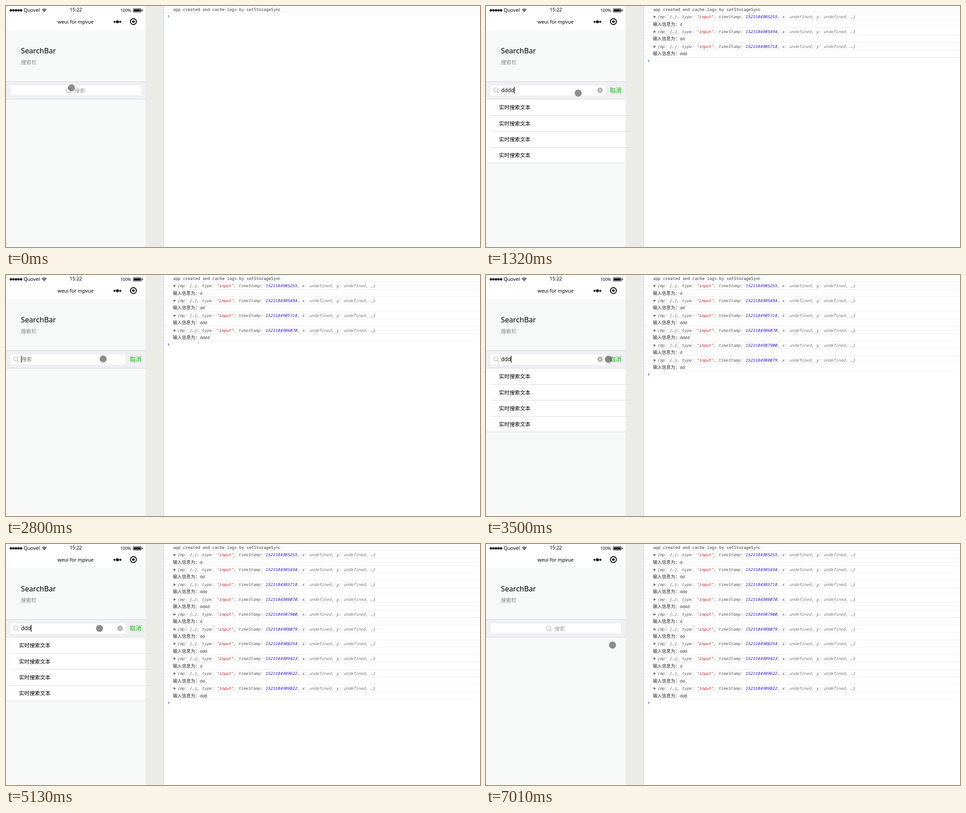
An HTML page that plays this animation: 1049 px wide and 534 px high, repeating every 7.08 s.

```html
<!DOCTYPE html>
<html lang="zh-CN">
<head>
<meta charset="utf-8">
<title>SearchBar</title>
<style>
  html, body { margin: 0; width: 100%; height: 100%; overflow: hidden; background: #fff; }
  svg { display: block; width: 1049px; height: 534px; }
  text { font-family: "Noto Sans", "Noto Sans CJK SC", sans-serif; white-space: pre; }
  .cjk { font-family: "Noto Sans CJK SC", sans-serif; font-size: 11.6px; }
  .mono { font-family: "Noto Sans Mono", monospace; font-size: 9.02px; fill: #303030; }
  .event { font-style: italic; fill: #565656; }
  .undef { fill: #747474; }
  .info { font-size: 9.85px; fill: #222; }
  .mid { text-anchor: middle; }
  .hint { fill: #888; }
  .field { fill: #fff; stroke: #e6e6ea; stroke-width: .6; }
</style>
</head>
<body>
<svg viewBox="0 0 1049 534">
  <defs>
    <g id="lens" fill="none" stroke="#a9a9a9" stroke-width="1.1">
      <circle r="4.8"/><path d="M3.5 3.5l3.4 3.4"/>
    </g>
  </defs>
  <rect width="309" height="534" fill="#f7f8f8"/>
  <rect width="309" height="53" fill="#fff"/>
  <rect x="309" width="40" height="534" fill="#ebece8"/>
  <rect x="349" width="1" height="534" fill="#d4d4d2"/>

  <g id="signal"></g>
  <text x="39" y="12.6" font-size="10.8">Quovel</text>
  <g fill="none" stroke="#000" stroke-width="1.4">
    <path d="M79.8 8.6Q84.6 4.6 89.4 8.6M81.6 10.6Q84.6 8.2 87.6 10.6"/>
    <circle cx="84.6" cy="12" r=".5"/>
  </g>
  <text class="mid" x="154.5" y="12.4" font-size="10.6">15:22</text>
  <text x="253" y="13.2" font-size="9.4">100%</text>
  <rect x="281.5" y="6" width="18" height="7.5" rx="1.5" fill="none" stroke="#000"/>
  <rect x="283" y="7.5" width="15" height="4.5"/>
  <rect x="301" y="8" width="1.4" height="3.5"/>
  <text class="mid" x="154" y="38.6" font-size="10.9">weui for mpvue</text>
  <circle cx="240.3" cy="35" r="2.3"/><circle cx="246.7" cy="35" r="3.2"/><circle cx="253" cy="35" r="2.3"/>
  <circle cx="282" cy="34.5" r="6.6" fill="none" stroke="#000" stroke-width="2"/>
  <circle cx="282" cy="34.5" r="2.8"/>

  <text x="33" y="105" font-size="16.2">SearchBar</text>
  <text class="cjk hint" x="33" y="129.3">搜索栏</text>

  <rect y="167" width="309" height="40" fill="#d7d6dc"/>
  <rect y="168" width="309" height="38" fill="#efeff4"/>

  <g id="idle">
    <rect class="field" x="9" y="175.5" width="290.5" height="23"/>
    <use href="#lens" x="138.5" y="186.8"/>
    <text class="cjk" x="151.5" y="192.2" fill="#9b9b9b">搜索</text>
  </g>
  <g id="focus">
    <rect class="field" x="9" y="175.5" width="256" height="23.5" rx="3"/>
    <use href="#lens" x="21.7" y="185.8"/>
    <text id="hint" class="cjk" x="34" y="191.2" fill="#808080">搜索</text>
    <text id="typed" x="33.5" y="191" font-size="11.8"></text>
    <g id="clear">
      <circle cx="252.4" cy="186.8" r="6" fill="#b2b2b2"/>
      <path d="M250.2 184.6l4.4 4.4m0-4.4l-4.4 4.4" stroke="#fff"/>
    </g>
    <text class="cjk" x="274" y="191.2" style="font-size:13px" fill="#09bb07">取消</text>
    <rect id="caret" y="179" width="1.2" height="15.5"/>
  </g>
  <g id="results"></g>

  <g id="logs"></g>
  <path id="prompt" d="M358.6 -2.6l2.8 2.6l-2.8 2.6" fill="none" stroke-width="1.3"/>
  <circle id="pointer" r="7.8" fill="#3a3a3a" fill-opacity=".58"/>
</svg>
<script>
const LOOP = 7080, ROW = 16.45, CHAR = 7.25, BLINK = 600;
const CLOCK = 1521184984700;  // wall clock at the start of the loop
const LOG_DELAY = 60;         // a letter shows this long before its log entry

const $ = id => document.getElementById(id);
const show = (id, on) => $(id).setAttribute('visibility', on ? 'inherit' : 'hidden');
const repeat = (n, make) => Array.from({ length: n }, (_, i) => make(i)).join('');
const line = (x, y, width, color) =>
  `<rect x="${x}" y="${Math.round(y)}" width="${width}" height="1" fill="${color}"/>`;

// Each search: focus, letters logged, emptied by the clear or cancel button
const searches = [
  { focus: 390, logs: [555, 794, 1018, 1370], end: 2450 },
  { focus: 2450, logs: [3200, 3379, 3554], end: 4050 },
  { focus: 4580, logs: [4723, 4922, 5122], end: 6860 }
];
const entries = searches.flatMap(s => s.logs.map((time, i) => ({ time, count: i + 1 })));

const spot = (x, y) => ({ x, y });
const start = spot(145, 181.5), field = spot(207, 187), cancel = spot(295, 187);

// Pointer trips: begin, end, destination, downward sag on the way
const trips = [
  [0, 70, spot(149, 187)],
  [390, 790, spot(204, 193)],
  [1320, 1860, spot(260, 190)],
  [2170, 2400, spot(252, 187)],
  [2480, 2800, spot(215, 186)],
  [3100, 3730, cancel],
  [4050, 4350, field],
  [5600, 6060, spot(248, 204), 22],
  [6060, 6700, cancel, 38],
  [6860, 7010, spot(280, 224)]
];

function pointerAt(t) {
  let { x, y } = start;
  for (const [begin, end, to, sag = 0] of trips) {
    const k = Math.min(1, Math.max(0, (t - begin) / (end - begin)));
    const eased = k * k * (3 - 2 * k);
    x += (to.x - x) * eased;
    y += (to.y - y) * eased + sag * Math.sin(Math.PI * k);
  }
  return spot(x, y);
}

function searchAt(t) {
  const search = searches.find(s => t >= s.focus && t < s.end);
  if (!search) return { focused: false, count: 0, caret: false };
  const keys = search.logs.map(time => time - LOG_DELAY).filter(time => time <= t);
  const lastInput = keys.at(-1) ?? search.focus;
  return { focused: true, count: keys.length, caret: (t - lastInput) % (2 * BLINK) < BLINK };
}

$('signal').innerHTML = repeat(5, i => `<circle cx="${10.7 + i * 5.7}" cy="9.6" r="2.6"/>`);

$('results').innerHTML = '<rect y="207" width="309" height="140" fill="#fff"/>' + repeat(4, i => {
  const top = 206.5 + i * 35.4, last = i === 3;
  return `<text class="cjk" x="28.8" y="${top + 22.6}">实时搜索文本</text>` +
    line(last ? 0 : 12, last ? 347 : top + 35.4, 309, '#d9d9d9');
}).replaceAll('x="12"', 'x="12"');

const baseline = row => Math.round(10.6 + row * ROW);
const rule = row => line(350, 14.3 + row * ROW, 699, '#ededed');
const undef = '<tspan class="undef">undefined</tspan>';

$('logs').innerHTML =
  `<text class="mono" x="370" y="${baseline(0)}">app created and cache logs by setStorageSync</text>${rule(0)}` +
  entries.map(({ time, count }, i) => {
    const row = i * 2 + 1, y = baseline(row), next = baseline(row + 1);
    return `<g class="entry"><path d="M371 ${y - 6}l5.4 3l-5.4 3z" fill="#6e6e6e"/>
      <text class="mono event" x="379" y="${y}">{mp: {…}, type: <tspan fill="#c41a16">"input"</tspan>, timeStamp: <tspan fill="#1c00cf">${CLOCK + time}</tspan>, x: ${undef}, y: ${undef}, …}</text>
      ${rule(row)}
      <text class="cjk info" x="369.5" y="${next + .4}">输入信息为：</text>
      <text class="mono" x="429" y="${next}">${'d'.repeat(count)}</text>
      ${rule(row + 1)}</g>`;
  }).join('');
const entryNodes = document.querySelectorAll('.entry');

function draw(t) {
  const { focused, count, caret } = searchAt(t);
  const logged = entries.filter(e => e.time <= t).length;
  const pointer = pointerAt(t);
  show('idle', !focused);
  show('focus', focused);
  show('hint', !count);
  show('clear', count);
  show('results', count);
  show('caret', caret);
  $('caret').setAttribute('x', 33.4 + count * CHAR);
  $('typed').textContent = 'd'.repeat(count);
  entryNodes.forEach((node, i) => node.setAttribute('visibility', i < logged ? 'visible' : 'hidden'));
  $('prompt').setAttribute('transform', `translate(0 ${22.8 + logged * 2 * ROW})`);
  $('prompt').setAttribute('stroke', logged ? '#367cf1' : '#5f8ba8');
  $('pointer').setAttribute('cx', pointer.x);
  $('pointer').setAttribute('cy', pointer.y);
}

let began;
function tick(now) {
  began ??= now;
  draw((now - began) % LOOP);
  requestAnimationFrame(tick);
}
draw(0);
requestAnimationFrame(tick);
</script>
</body>
</html>
```
